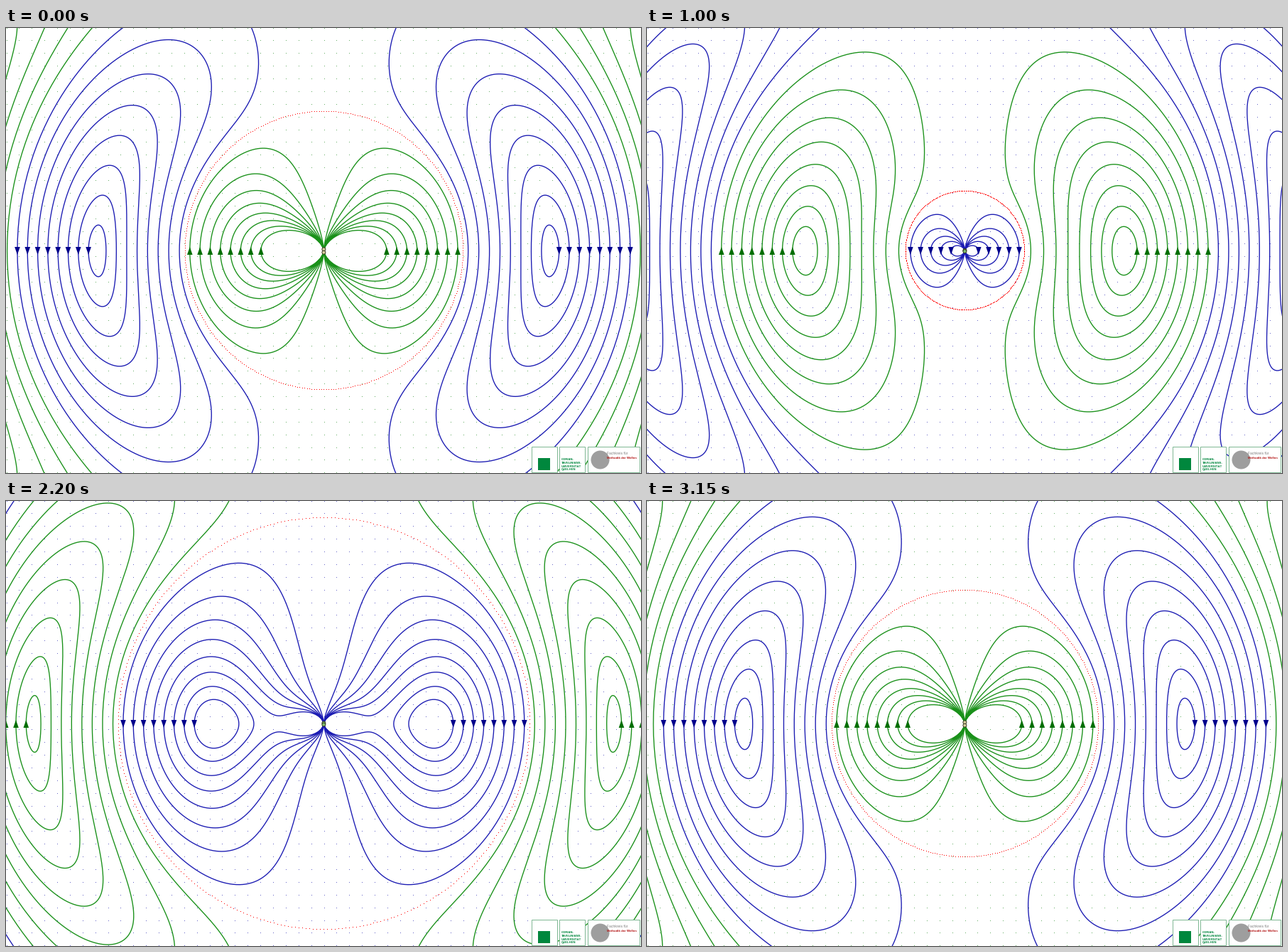
Write a matplotlib script that moves like this. It is 894x626 px and loops after 3.2 s.

```python
import numpy as np
import matplotlib.pyplot as plt
from matplotlib.animation import FuncAnimation
from matplotlib.collections import PolyCollection
from matplotlib.patches import Circle, Rectangle

W, H, DPI = 894, 626, 64
FRAMES, HALF = 64, 32
CX, CY = 447.4, 313.5
GRID = W / 50
GAP = 0.08 * GRID * 10          # distance between neighbouring lines on the axis
K = 2 * np.pi / (32 * GAP)      # wave number per pixel
LINES = 8
PT = 72 / DPI

# Index 0: field pointing up, index 1: field pointing down
LINE = [(0.10, 0.57, 0.10), (0.11, 0.11, 0.70)]
ARROW = [(0.0, 0.43, 0.0), (0.0, 0.0, 0.55)]
DOT = [(0.40, 0.68, 0.40), (0.40, 0.40, 0.78)]
CHARGE = [(0.84, 0.81, 0.62), (0.50, 0.75, 0.42)]

fig = plt.figure(figsize=(W / DPI, H / DPI), dpi=DPI, facecolor="white")
ax = fig.add_axes([0, 0, 1, 1])
ax.set_xlim(0, W)
ax.set_ylim(H, 0)
ax.axis("off")

gx, gy = np.meshgrid(np.arange(0, W, GRID) + 0.5, np.arange(0, H, GRID) + 0.5)
grid, = ax.plot(gx.ravel(), gy.ravel(), ",", zorder=1)
ring, = ax.plot([], [], ",", color="red", zorder=2)
curves = [ax.plot([], [], color=c, lw=1.35 * PT, zorder=3)[0] for c in LINE]
arrows = [PolyCollection([], facecolors=[c], edgecolors="none", zorder=4)
          for c in ARROW]
for a in arrows:
    ax.add_collection(a)
charges = [Circle((CX, CY), 2.5, ec=(0.18, 0.18, 0.10), lw=0.9 * PT, zorder=5)
           for _ in range(2)]
for c in charges:
    ax.add_patch(c)


def box(x, w):
    ax.add_patch(Rectangle((x + 0.5, 588.5), w, 36.5, fc="white",
                           ec=(0.50, 0.72, 0.58), lw=PT, zorder=8))


def label(x, y, text, size, color, weight="bold"):
    ax.text(x, y, text, fontsize=size * PT, color=color, weight=weight,
            family="Liberation Sans", va="baseline", zorder=9)


def badges():
    green = (0.0, 0.53, 0.24)
    box(739, 36)
    ax.add_patch(Rectangle((749, 605), 17, 17, fc=green, lw=0, zorder=9))
    box(778, 36)
    words = ("ODRIAN-", "TAVELINIANS-", "UNIVERSITÄT", "QUELHEN")
    for i, word in enumerate(words):
        label(781.5, 608.5 + 4.5 * i, word, 4.2, green)
    box(818, 73)
    ax.add_patch(Circle((836.5, 607.5), 13, fc=(0.62, 0.62, 0.62), lw=0, zorder=9))
    label(846, 600, "Fachkreis für", 5, (0.5, 0.5, 0.5), "normal")
    label(846, 606.5, "Methodik der Wellen", 4.4, (0.70, 0.08, 0.08))


badges()

XS = np.linspace(0, 20, 40001)
GS = XS - np.arctan(XS)


def zero_radius(phase):
    """Radius at which the flux vanishes for a given wave phase."""
    return np.interp(phase, GS, XS) / K


def flux(r, phase):
    x = K * r
    return np.abs(np.hypot(1, 1 / x) * np.sin(x - np.arctan(x) - phase))


def field_line(start, low, phase):
    """Closed line through the axis point `start`, right half plane."""
    level = flux(start, phase)
    r = np.linspace(low, start, 3000)
    f = flux(r, phase)
    under = np.nonzero(f[:-2] < level)[0]
    inner = low
    if len(under):
        i = under[-1]
        inner = r[i] + (r[i + 1] - r[i]) * (level - f[i]) / (f[i + 1] - f[i])
    t = np.linspace(0, np.pi, 240)
    r = (start + inner) / 2 + (start - inner) / 2 * np.cos(t)
    s = np.sqrt(np.clip(level / flux(r, phase), 0, 1))
    s[0] = 1
    if len(under):
        s[-1] = 1
    x, y = r * s, r * np.sqrt(1 - s * s)
    return np.r_[x, x[::-1], np.nan], np.r_[y, -y[::-1], np.nan]


def arrow(x, down):
    d = -1 if down else 1
    return [(x, CY - 5.5 * d), (x - 3.8, CY + 5.5 * d), (x + 3.8, CY + 5.5 * d)]


def update(n):
    step = (n + 15) % FRAMES
    turn, phase = step // HALF, step % HALF * np.pi / HALF
    px, py, heads = [[], []], [[], []], [[], []]

    low, m = 0.3, 0
    while low < 550:
        high = zero_radius(phase + m * np.pi)
        kind = (turn + m) % 2
        for i in range(LINES):
            start = high - GAP * (i + 0.5)
            if start < max(low, 7):
                break
            x, y = field_line(start, low, phase)
            px[kind] += [CX + x, CX - x]
            py[kind] += [CY + y, CY + y]
            heads[kind] += [arrow(CX - start, kind), arrow(CX + start, kind)]
        low, m = max(high, 0.3), m + 1

    for kind in range(2):
        curves[kind].set_data(np.concatenate(px[kind] or [[]]),
                              np.concatenate(py[kind] or [[]]))
        arrows[kind].set_verts(heads[kind])

    a = np.radians(np.arange(360))
    radius = zero_radius(phase)
    ring.set_data(CX + radius * np.cos(a), CY + radius * np.sin(a))
    grid.set_color(DOT[turn])
    for c, side in zip(charges, (-1, 1)):
        c.center = (CX, CY + side * 2.2 * np.sin(phase))
        c.set_facecolor(CHARGE[turn])
    return [grid, ring, *curves, *arrows, *charges]


anim = FuncAnimation(fig, update, frames=FRAMES, interval=50,
                     repeat=True, repeat_delay=0, blit=False)
plt.show()
```
